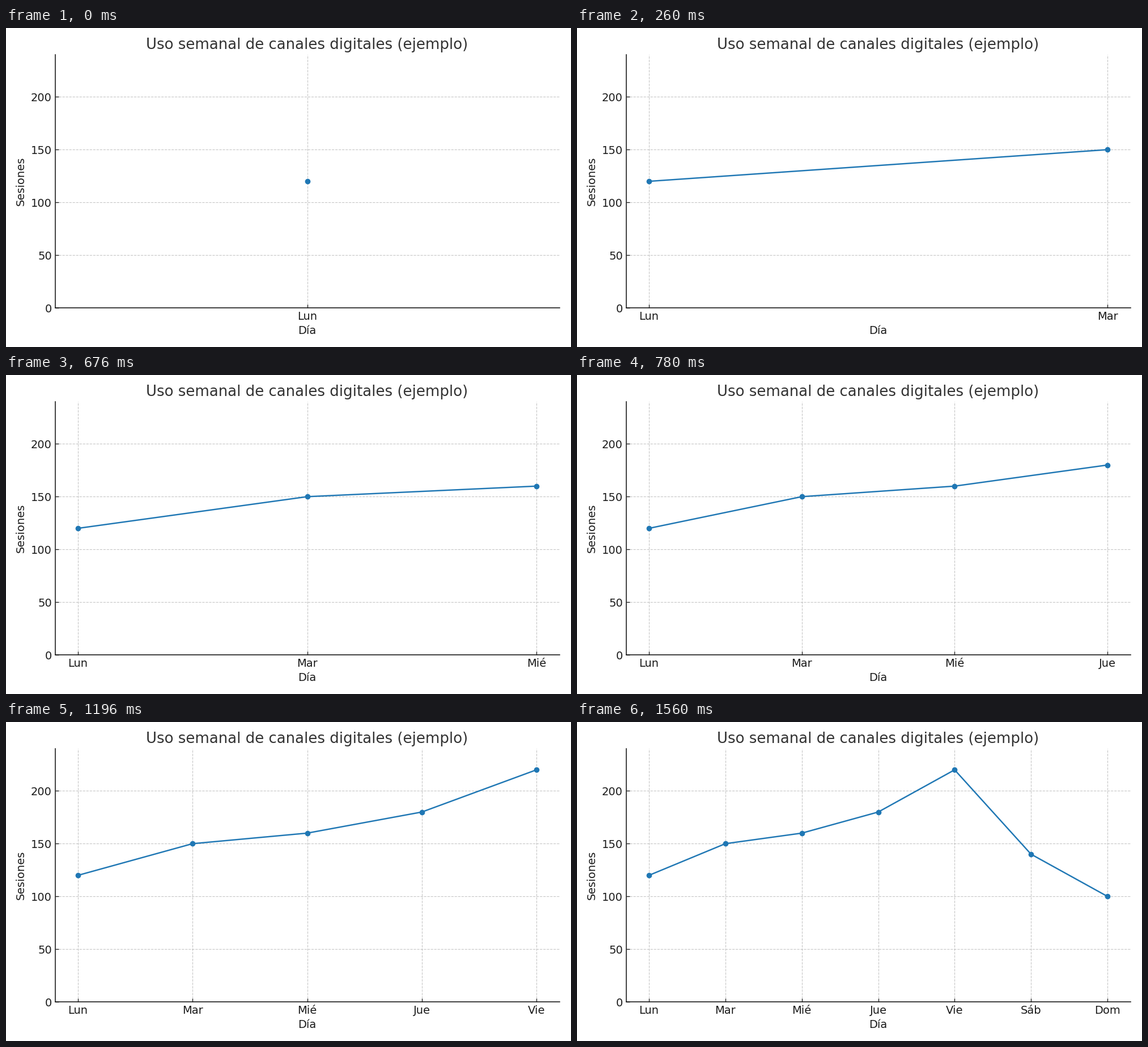
These frames come from a looping animation (997x562 px, 1820 ms). A matplotlib script:

```python
import matplotlib.pyplot as plt
from matplotlib.animation import FuncAnimation

W, H, DPI = 997, 562, 116.8
LEFT, RIGHT, TOP, BOTTOM = 86.6, 976.5, 47.1, 493.1
INK = "#1a1a1a"

days = ["Lun", "Mar", "Mié", "Jue", "Vie", "Sáb", "Dom"]
sessions = [120, 150, 160, 180, 220, 140, 100]

plt.rcParams.update({
    "font.family": "DejaVu Sans",
    "font.size": 12,
    "axes.labelcolor": INK,
    "axes.edgecolor": INK,
    "axes.linewidth": 1.0,
    "xtick.color": INK,
    "ytick.color": INK,
    "xtick.direction": "in",
    "ytick.direction": "in",
})

# The tiny margin keeps the pixel size from rounding down.
fig = plt.figure(figsize=((W + 1e-9) / DPI, (H + 1e-9) / DPI), dpi=DPI,
                 facecolor="white")
ax = fig.add_axes([LEFT / W, 1 - BOTTOM / H,
                   (RIGHT - LEFT) / W, (BOTTOM - TOP) / H])
ax.spines[["top", "right"]].set_visible(False)
ax.set_title("Uso semanal de canales digitales (ejemplo)",
             fontsize=16, color="#333333")
ax.set_xlabel("Día")
ax.set_ylabel("Sesiones", labelpad=4.8)
ax.set_ylim(0, 240)
ax.set_yticks(range(0, 201, 50))
ax.set_axisbelow(True)
ax.grid(True, linestyle="--", linewidth=0.7, color="#b0b0b0", alpha=0.7)

line, = ax.plot([], [], color="#1f77b4", linewidth=1.5,
                marker="o", markersize=6, markeredgewidth=0)


def update(i):
    n = i + 1
    line.set_data(range(n), sessions[:n])
    ax.set_xticks(range(n), days[:n])
    pad = 0.05 * i if i else 0.05
    ax.set_xlim(-pad, i + pad)
    return line,


anim = FuncAnimation(fig, update, frames=len(days), interval=260,
                     repeat=True, repeat_delay=0, blit=False)
plt.show()
```
